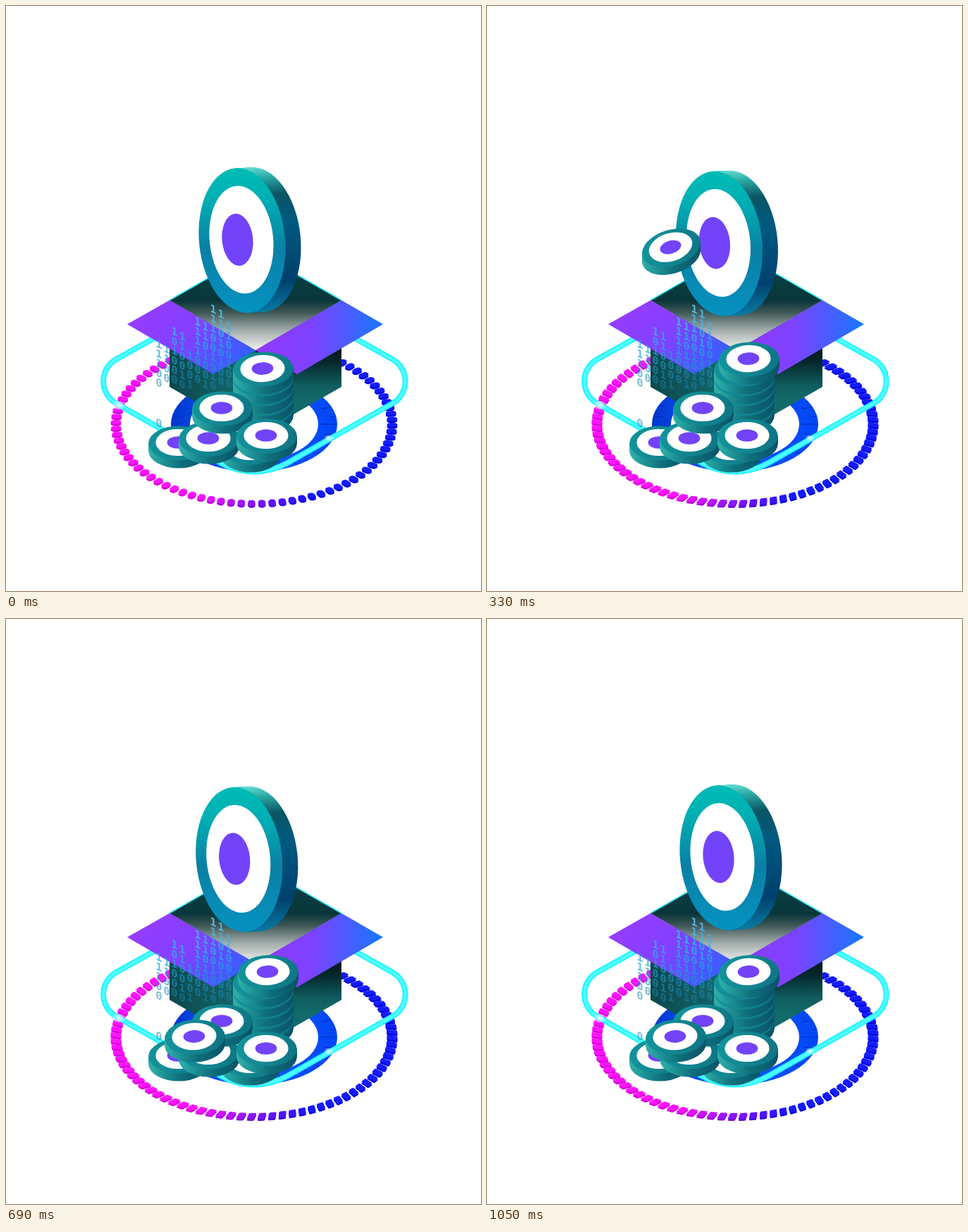
These frames come from a looping animation (674 px wide and 831 px high, 1.08 s). An HTML page with a canvas:

```html
<!DOCTYPE html>
<html lang="en">
<head>
<meta charset="utf-8">
<title>Coins falling on a box</title>
<style>
html, body { margin: 0; width: 100%; height: 100%; overflow: hidden; background: #fff; }
canvas { display: block; }
</style>
</head>
<body>
<canvas id="stage" width="674" height="831"></canvas>
<script>
const ctx = document.getElementById('stage').getContext('2d');
const LOOP = 1080, STEP = 30, TAU = Math.PI * 2;
const RING = { x: 352, y: 594, squash: 0.577 };

// Linear interpolation through [time, ...values] keys
function track(keys, t) {
  const i = keys.findIndex(k => k[0] > t);
  if (i < 0) return keys[keys.length - 1].slice(1);
  const a = keys[i - 1], b = keys[i], p = (t - a[0]) / (b[0] - a[0]);
  return a.slice(1).map((v, j) => v + (b[j + 1] - v) * p);
}

function gradient(x0, y0, x1, y1, ...stops) {
  const g = ctx.createLinearGradient(x0, y0, x1, y1);
  stops.forEach(([at, color]) => g.addColorStop(at, color));
  return g;
}

function poly(fill, ...points) {
  ctx.beginPath();
  points.forEach(p => ctx.lineTo(...p));
  ctx.closePath();
  ctx.fillStyle = fill;
  ctx.fill();
}

function ellipse(x, y, rx, ry, rot, fill) {
  ctx.beginPath();
  ctx.ellipse(x, y, rx, ry, rot, 0, TAU);
  ctx.fillStyle = fill;
  ctx.fill();
}

function dash(angle, y, round, fill) {
  ctx.save();
  ctx.translate(RING.x, y);
  ctx.scale(1, RING.squash);
  ctx.rotate(angle);
  ctx.translate(196, 0);
  if (!round) ctx.transform(1, 0.25, 0, 1, 0, 0);
  ctx.beginPath();
  ctx.roundRect(-7.5, -5.2, 15, 10.4, round ? 5.2 : 2);
  ctx.fillStyle = fill;
  ctx.fill();
  ctx.restore();
}

function dashRing(t) {
  const round = t < 60 || (t > 340 && t < 680);
  for (let i = 0; i < 84; i++) {
    const a = i * TAU / 84 + 0.018;
    const x = RING.x + 196 * Math.cos(a);
    const hue = 300 - 62 * Math.min(1, Math.max(0, (x - 270) / 165));
    dash(a, RING.y + 1.5, round, `hsl(${hue} 100% 43%)`);
    dash(a, RING.y - 1, round, `hsl(${hue} 100% 54%)`);
  }
}

function innerRing() {
  ctx.beginPath();
  ctx.ellipse(RING.x, RING.y, 118, 68, 0, 0, TAU);
  ctx.ellipse(RING.x, RING.y, 91, 52, 0, 0, TAU, true);
  ctx.fillStyle = gradient(234, 0, 471, 0, [0, '#0038d0'], [0.45, '#1a5cff'], [1, '#0046f5']);
  ctx.fill('evenodd');
  ctx.beginPath();
  for (let i = 0; i < 30; i++) {
    const a = i * TAU / 30 + 0.05 * Math.sin(i * 7);
    const c = Math.cos(a), s = Math.sin(a), r = 94 + 8 * (i % 3);
    ctx.moveTo(RING.x + r * c, RING.y + r * RING.squash * s);
    ctx.lineTo(RING.x + 117 * c, RING.y + 67 * s);
  }
  ctx.strokeStyle = '#0028b8';
  ctx.lineWidth = 1;
  ctx.stroke();
}

function glow(x, y, r) {
  const g = ctx.createRadialGradient(x, y, 0, x, y, r);
  g.addColorStop(0, '#dfff');
  g.addColorStop(1, '#dff0');
  ellipse(x, y, r, r * 0.6, 0, g);
}

function rail() {
  ctx.beginPath();
  ctx.moveTo(228, 462);
  ctx.arcTo(352, 392, 604, 533, 97);
  ctx.arcTo(604, 533, 352, 676, 36);
  ctx.arcTo(352, 676, 101, 533, 97);
  ctx.arcTo(101, 533, 352, 392, 36);
  ctx.closePath();
  for (const [width, color] of [[8, '#22f4ff'], [4, '#50ffff']]) {
    ctx.lineWidth = width;
    ctx.strokeStyle = color;
    ctx.stroke();
  }
  glow(160, 567, 10);
  glow(458, 614, 7);
}

function box() {
  const left = [232, 418], back = [354, 348], right = [476, 418], front = [354, 489];
  poly(gradient(232, 0, 354, 0, [0, '#0b484c'], [1, '#176c70']),
    left, front, [354, 611], [232, 541]);
  poly(gradient(0, 488, 0, 560, [0, '#04191c'], [0.25, '#06282c'], [0.7, '#0f5c5e'], [1, '#126a6a']),
    front, right, [476, 541], [354, 611]);
  poly(gradient(0, 348, 0, 489, [0, '#0a4648'], [0.5, '#08363a'], [0.62, '#3f5856'],
    [0.8, '#a3adab'], [1, '#f2f2f2']), left, back, right, front);
  ctx.beginPath();
  [left, back, right].forEach(p => ctx.lineTo(...p));
  ctx.strokeStyle = '#20e8f0';
  ctx.lineWidth = 1.5;
  ctx.stroke();
  poly(gradient(200, 420, 330, 530, [0, '#963cff'], [0.45, '#8240ff'], [1, '#2864ff']),
    left, front, [294, 523], [172, 452]);
  poly(gradient(354, 0, 535, 0, [0, '#9238ff'], [0.45, '#7c42ff'], [1, '#1578ff']),
    right, [535, 452], [413, 523], front);
}

function digits() {
  const columns = [[482, '11100'], [489, '1100'], [464, '101000'], [471, '110010'], [498, '1001'],
    [450, '1111000'], [457, '1101001'], [432, '111001010'], [439, '11010100'], [456, '1100100']];
  ctx.font = 'bold 15px "DejaVu Sans Mono", monospace';
  ctx.textAlign = 'center';
  ctx.textBaseline = 'middle';
  const glyph = (text, x, y, fade) => {
    ctx.save();
    ctx.transform(1, 0.4, 0, 1, x, y);
    ctx.globalAlpha = 1 - 0.5 * fade;
    ctx.fillStyle = `hsl(198 75% ${62 - 24 * fade}%)`;
    ctx.fillText(text, 0, 0);
    ctx.restore();
  };
  columns.forEach(([top, text], i) => [...text].forEach((d, row) => {
    const y = top + row * 13.6;
    glyph(d, 217 + i * 11, y, Math.min(1, (y - 430) / 120));
  }));
  glyph('0', 217, 594, 0.8);
}

// A disc with thickness (dx, dy) and a plain badge on its face
function disc(x, y, rx, ry, rot, dx, dy, side, rim, inset) {
  ctx.save();
  ctx.translate(x, y);
  const depth = Math.max(dx, dy);
  for (let i = depth; i > 0; i--) ellipse(dx * i / depth, dy * i / depth, rx, ry, rot, side);
  ellipse(0, 0, rx, ry, rot, rim);
  ellipse(-1, -1, rx * 0.74, ry * inset, rot, '#fff');
  ellipse(-1 - dx * 0.25, -1, rx * 0.36, ry * 0.36, rot, '#7343fa');
  ctx.restore();
}

function coin(x, y, degrees = 0) {
  const ry = 24.5 + Math.abs(degrees) * 0.065;
  disc(x, y, 42.7, ry, degrees * Math.PI / 180, 0, 11,
    gradient(-42, 0, 42, 0, [0, '#30b0aa'], [0.22, '#1f9698'], [0.55, '#0e6e7a'], [1, '#095468']),
    gradient(-42, -10, 42, 10, [0, '#12949a'], [0.5, '#138692'], [1, '#0e7484']), 0.78);
}

function bigCoin(t) {
  const [dx, dy] = track([[0, 0, 0], [150, -2.3, 0.7], [270, -4.8, 3], [420, -6.8, 7],
    [570, -6.5, 9], [780, -2.5, 8.5], [1050, 0, 6]], t);
  disc(335 + dx, 333 + dy, 61, 103, -0.1, 22, -1,
    gradient(30, -104, 50, 104, [0, '#5cd8cc'], [0.07, '#2aa8a4'], [0.19, '#0a5464'],
      [0.38, '#005a80'], [0.78, '#00406e'], [1, '#0a80a8']),
    gradient(0, -103, 0, 103, [0, '#00bcb6'], [0.2, '#00b0b4'], [0.55, '#0a80a4'], [1, '#0592c2']), 0.745);
}

function draw(t) {
  ctx.fillStyle = '#fff';
  ctx.fillRect(0, 0, 674, 831);
  dashRing(t);
  innerRing();
  rail();
  box();
  bigCoin(t);
  digits();
  for (let y = 572; y >= 516; y -= 14) coin(365, y, -2);
  coin(...track([[0, 367, -60, -40], [150, 369, 251, -22], [270, 371.5, 441, -5], [318, 372, 502, -2]], t));
  coin(347, 627);
  coin(245, 621);
  coin(288, 615);
  coin(307, 572);
  coin(370, 611);
  coin(...track([[0, 252, -50, -50], [150, 255.5, 104, -38], [270, 258.5, 230, -25],
    [420, 266, 514, -5], [470, 268, 594, -3]], t));
}

function tick() {
  draw(Math.floor(performance.now() % LOOP / STEP) * STEP);
  requestAnimationFrame(tick);
}
tick();
</script>
</body>
</html>
```
